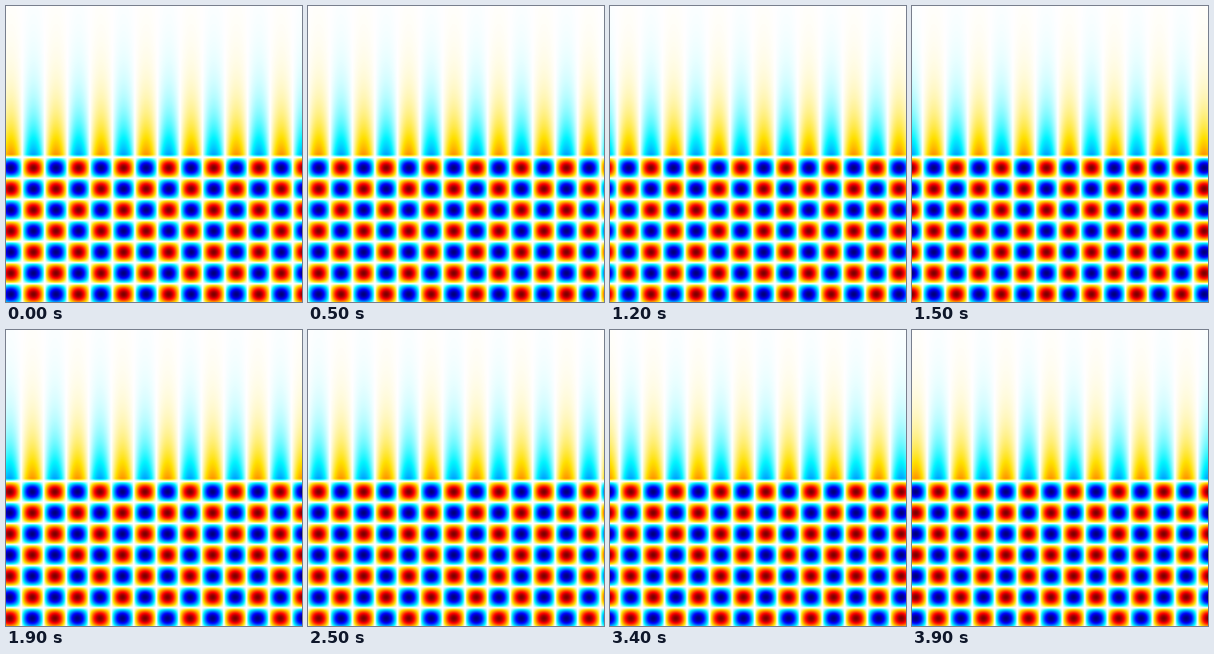
Animation of 400x400 px, one loop 4000 ms. Source, as a matplotlib script:

```python
import numpy as np
import matplotlib.pyplot as plt
from matplotlib.animation import FuncAnimation
from matplotlib.colors import LinearSegmentedColormap

SIZE, FRAMES, INTERVAL = 400, 40, 100
INDEX = 1.5                      # refractive index of the lower medium
PERIOD_X, PERIOD_Y = 60.9, 56.96

kx, ky = 2 * np.pi / PERIOD_X, 2 * np.pi / PERIOD_Y
k_air = np.hypot(kx, ky) / INDEX
decay = np.sqrt(kx**2 - k_air**2)
shift = np.arctan(INDEX**2 * decay / ky)

# Standing wave below the interface, evanescent tail above it
pos = np.arange(SIZE) - SIZE / 2
profile = np.where(pos > 0,
                   np.sin(ky * pos - shift),
                   -np.sin(shift) * np.exp(decay * np.minimum(pos, 0)))

cmap = LinearSegmentedColormap.from_list("white_jet", [
    (0, (0, 0, 0.5)), (0.125, (0, 0, 1)), (0.375, (0, 0.96, 1)),
    (0.5, (1, 1, 1)),
    (0.625, (1, 0.88, 0)), (0.875, (1, 0, 0)), (1, (0.5, 0, 0))], N=1024)


def field(i):
    wave = np.sin(kx * pos - shift - 2 * np.pi * i / FRAMES)
    return np.outer(profile, wave)


fig = plt.figure(figsize=(SIZE / 100, SIZE / 100), dpi=100)
ax = fig.add_axes([0, 0, 1, 1])
ax.axis("off")
image = ax.imshow(field(0), cmap=cmap, vmin=-1, vmax=1,
                  interpolation="nearest", aspect="auto")


def update(i):
    image.set_data(field(i))
    return [image]


anim = FuncAnimation(fig, update, frames=FRAMES, interval=INTERVAL,
                     repeat=True, repeat_delay=0, blit=False)
plt.show()
```
